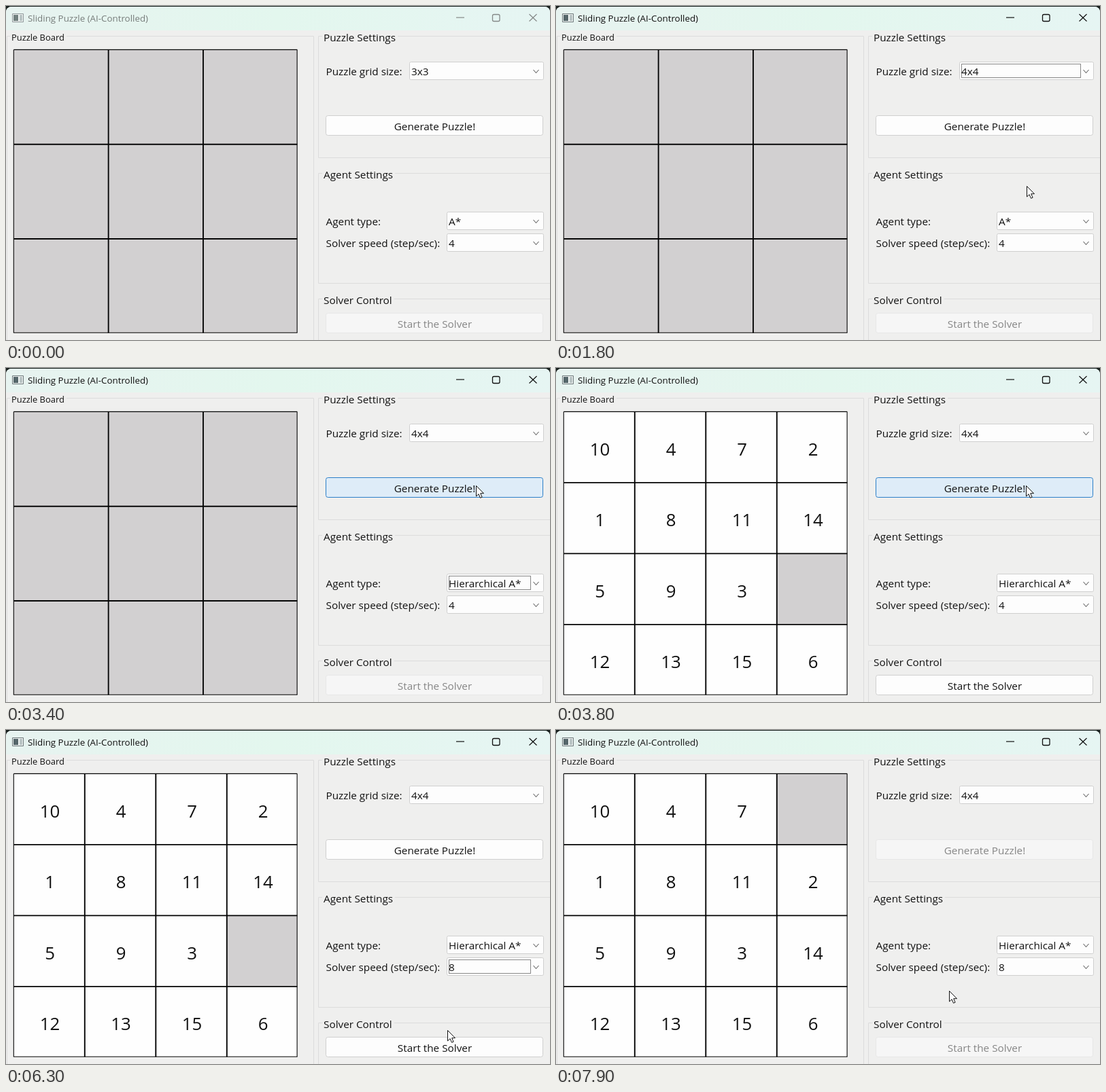
Write an HTML page with a canvas that moves like this. It is 800x492 px and loops after 8 s.

```html
<!DOCTYPE html>
<html lang="en">
<head>
<meta charset="utf-8">
<title>Sliding Puzzle</title>
<style>
  html, body { margin: 0; width: 100%; height: 100%; overflow: hidden; background: #efefee; }
  canvas { display: block; width: 800px; height: 492px; }
</style>
</head>
<body>
<canvas id="stage" width="800" height="492"></canvas>
<script>
const ctx = document.getElementById('stage').getContext('2d');
const LOOP = 8000, STEP = 100, ROW = 32, GLIDE = 600, SOLVE = 7800;
const FONT = '"Open Sans", "Noto Sans", sans-serif';
const INK = '#111', GRAY = '#868686', BLUE = '#0078d7', LINE = '#cfcfcf', HOT = '#2b7fc8';

// Each widget is clicked at time "at"; a combo closes again at "close"
const COMBOS = [
  { y: 82, x: 593, at: 1000, close: 1500, pick: 1, below: true, items: ['3x3', '4x4', '5x5'] },
  { y: 303, x: 648, at: 2200, close: 3000, pick: 1,
    items: ['A*', 'Hierarchical A*', 'Greedy', 'Q-Learning', 'Sarsa', 'row greedy'] },
  { y: 335, x: 648, at: 4800, close: 5600, pick: 3, items: ['4', '1', '2', '8'] }
];
const generate = { y: 161, at: 3600, label: 'Generate Puzzle!' };
const solve = { y: 452, at: 7000, label: 'Start the Solver' };
const WIDGETS = [...COMBOS, generate, solve].sort((a, b) => a.at - b.at);
const TILES = [10, 4, 7, 2, 1, 8, 11, 14, 5, 9, 3, 0, 12, 13, 15, 6];

// Pointer stops: arrival time, x, y
const STOPS = [
  [200, 798, 236], [1000, 696, 96], [1500, 696, 158], [1800, 692, 265], [2200, 697, 317],
  [2600, 697, 249], [3000, 692, 161], [3400, 691, 173], [4600, 691, 347], [5600, 687, 320],
  [6300, 649, 442], [6700, 633, 464], [7700, 578, 384]
];

function text(str, x, y, size = 15.3, color = INK, align = 'left', weight = 400) {
  ctx.font = `${weight} ${size}px ${FONT}`;
  ctx.textAlign = align;
  ctx.fillStyle = color;
  ctx.fillText(str, x, y);
}

function line(color, width, ...pts) {
  ctx.strokeStyle = color;
  ctx.lineWidth = width;
  ctx.beginPath();
  pts.forEach(([x, y]) => ctx.lineTo(x, y));
  ctx.stroke();
}

function box(x, y, w, h, fill, stroke, r = 0) {
  ctx.beginPath();
  ctx.roundRect(x + 0.5, y + 0.5, w, h, r);
  ctx.fillStyle = fill;
  ctx.fill();
  ctx.strokeStyle = stroke;
  ctx.lineWidth = 1;
  ctx.stroke();
}

// Glides into each stop, then rests until the next glide
function pointerAt(t) {
  const i = STOPS.findLastIndex(s => s[0] <= t);
  if (i < 0) return null;
  const [t0, x0, y0] = STOPS[i], [t1, x1, y1] = STOPS[i + 1] || [LOOP, x0, y0];
  const span = Math.min(GLIDE, t1 - t0);
  const u = Math.max(0, 1 - (t1 - t) / span), k = u * u * (3 - 2 * u);
  return [x0 + (x1 - x0) * k, y0 + (y1 - y0) * k];
}

function inside(p, x, y, w, h) {
  return p && p[0] >= x && p[0] <= x + w && p[1] >= y && p[1] <= y + h;
}

function drawWindow(active) {
  ctx.fillStyle = '#18201e';
  ctx.fillRect(0, 0, 800, 20);
  ctx.beginPath();
  ctx.roundRect(0, 1, 800, 510, 8);
  ctx.fillStyle = '#efefee';
  ctx.fill();
  ctx.save();
  ctx.clip();
  const g = ctx.createLinearGradient(0, 0, 800, 0);
  ['#e7f3f0', '#e3f7ee', '#e6f5f3'].forEach((c, i) => g.addColorStop(i / 2, c));
  ctx.fillStyle = g;
  ctx.fillRect(0, 0, 800, 36);
  ctx.restore();

  const c = active ? INK : '#858988';
  box(9, 11, 16, 12, '#f2f6f5', active ? '#6c7779' : '#8d9698');
  ctx.fillStyle = active ? '#55666a' : '#71807f';
  ctx.fillRect(11, 13, 7, 9);
  ctx.fillStyle = '#b9c4c4';
  ctx.fillRect(20, 13, 4, 9);
  text('Sliding Puzzle (AI-Controlled)', 32, 23, 13.35, active ? INK : '#777d7b');
  line(c, 1.2, [662, 17], [674, 17]);
  ctx.beginPath();
  ctx.roundRect(715.5, 12.5, 10.5, 10, 2);
  ctx.lineWidth = 1.3;
  ctx.stroke();
  line(c, 1.2, [769.5, 12], [780.5, 22.5]);
  line(c, 1.2, [780.5, 12], [769.5, 22.5]);
}

function group(title, x, y, right, bottom, size = 15.3) {
  const tx = Math.round(x + size / 2);
  text(title, tx, y + size / 2, size);
  const end = tx + ctx.measureText(title).width + 3;
  line('#dcdcdc', 1, [tx - 2, y], [x, y], [x, bottom], [right, bottom], [right, y], [end, y]);
}

function drawBoard(t) {
  const ready = t > generate.at, n = ready ? 4 : 3, s = 418 / n, x0 = 11.3, y0 = 64.4;
  const tiles = TILES.slice();
  // The blank climbs one row per step
  for (let at = SOLVE, gap = tiles.indexOf(0); at <= t; at += STEP, gap -= 4) {
    [tiles[gap], tiles[gap - 4]] = [tiles[gap - 4], 0];
  }
  for (let i = 0; i < n * n; i++) {
    const x = x0 + (i % n) * s, y = y0 + Math.floor(i / n) * s;
    const value = ready && tiles[i];
    ctx.fillStyle = value ? '#fefefe' : '#d2d0d1';
    ctx.fillRect(x, y, s - 1, s - 1);
    if (value) text(value, x + s / 2 + 1, y + s / 2 + 12.3, 25.8, INK, 'center');
  }
  for (let i = 0; i <= n; i++) {
    const d = i < n ? i * s : 416.8, w = i % n ? 1.9 : 1.1;
    line('#050505', w, [x0 + d, y0], [x0 + d, y0 + 417]);
    line('#050505', w, [x0, y0 + d], [x0 + 417, y0 + d]);
  }
}

function button({ label, y, at }, enabled, t, p) {
  const hot = enabled && inside(p, 470, y, 320, 30), down = hot && t === at;
  box(470, y, 319, 29,
    !enabled ? '#f6f6f6' : down ? '#cce4f7' : hot ? '#deecf8' : '#fdfdfd',
    !enabled ? '#e7e7e7' : hot ? HOT : LINE, 3);
  text(label, 630.5, y + 22, 15.3, enabled ? INK : GRAY, 'center');
}

const isOpen = (c, t) => t >= c.at && t < c.close;

function combo(c, t, p) {
  const { x, y } = c, right = 790, w = right - x;
  const open = isOpen(c, t), hot = open || inside(p, x, y, w, 27);
  box(x, y, w, 26, open ? '#cce4f7' : hot ? '#e2effa' : '#fdfdfd', hot ? HOT : LINE, 2);
  text(c.items[t >= c.close ? c.pick : 0], x + 3, y + 20);
  line('#6a6a6a', 1.1, [right - 14.5, y + 12], [right - 10.5, y + 16.5], [right - 6.5, y + 12]);
  if (WIDGETS.findLast(f => f.at <= t) === c) {
    ctx.setLineDash([1, 1]);
    ctx.strokeStyle = INK;
    ctx.lineWidth = 1;
    ctx.strokeRect(x + 3.5, y + 3.5, w - 22, 20);
    ctx.setLineDash([]);
  }
}

function popup(c, p) {
  const w = 790 - c.x, h = c.items.length * ROW, y = c.below ? c.y + 28 : c.y - h;
  const hover = inside(p, c.x, y, w, h - 1) ? Math.floor((p[1] - y) / ROW) : 0;
  box(c.x, y - 1, w, h, '#f0f0f0', '#8f9498');
  c.items.forEach((item, i) => {
    const on = i === hover, top = y + i * ROW;
    if (on) {
      ctx.fillStyle = BLUE;
      ctx.fillRect(c.x, top - 1, w + 1, ROW + 1);
    }
    text(item, c.x + 8, top + 22, 12.9, on ? '#f4f8fc' : INK, 'left', i || on ? 400 : 700);
  });
}

function drawPointer([x, y]) {
  ctx.save();
  ctx.translate(x + 0.5, y + 0.5);
  ctx.beginPath();
  [[0, 0], [0, 15.5], [3.6, 12.2], [6, 17.8], [8.6, 16.7], [6.2, 11.2], [11, 11.2]]
    .forEach(pt => ctx.lineTo(...pt));
  ctx.closePath();
  ctx.fillStyle = '#fff';
  ctx.fill();
  ctx.strokeStyle = INK;
  ctx.lineWidth = 1;
  ctx.stroke();
  ctx.restore();
}

function draw(t) {
  const p = pointerAt(t), solving = t > solve.at;
  drawWindow(t >= COMBOS[0].at);
  group('Puzzle Board', 1.5, 44.5, 452.5, 500, 12.9);
  group('Puzzle Settings', 459.5, 44.5, 810, 223.5);
  group('Agent Settings', 459.5, 246.5, 810, 408.5);
  group('Solver Control', 459.5, 431.5, 810, 500);
  drawBoard(t);
  ['Puzzle grid size:', 'Agent type:', 'Solver speed (step/sec):']
    .forEach((label, i) => text(label, 470.5, COMBOS[i].y + 20));
  button(generate, !solving, t, p);
  button(solve, t > generate.at && !solving, t, p);
  COMBOS.forEach(c => combo(c, t, p));
  COMBOS.filter(c => isOpen(c, t)).forEach(c => popup(c, p));
  if (p) drawPointer(p);
}

const start = performance.now();
function tick() {
  const t = (performance.now() - start) % LOOP;
  draw(Math.floor(t / STEP) * STEP);
  requestAnimationFrame(tick);
}
tick();
</script>
</body>
</html>
```
